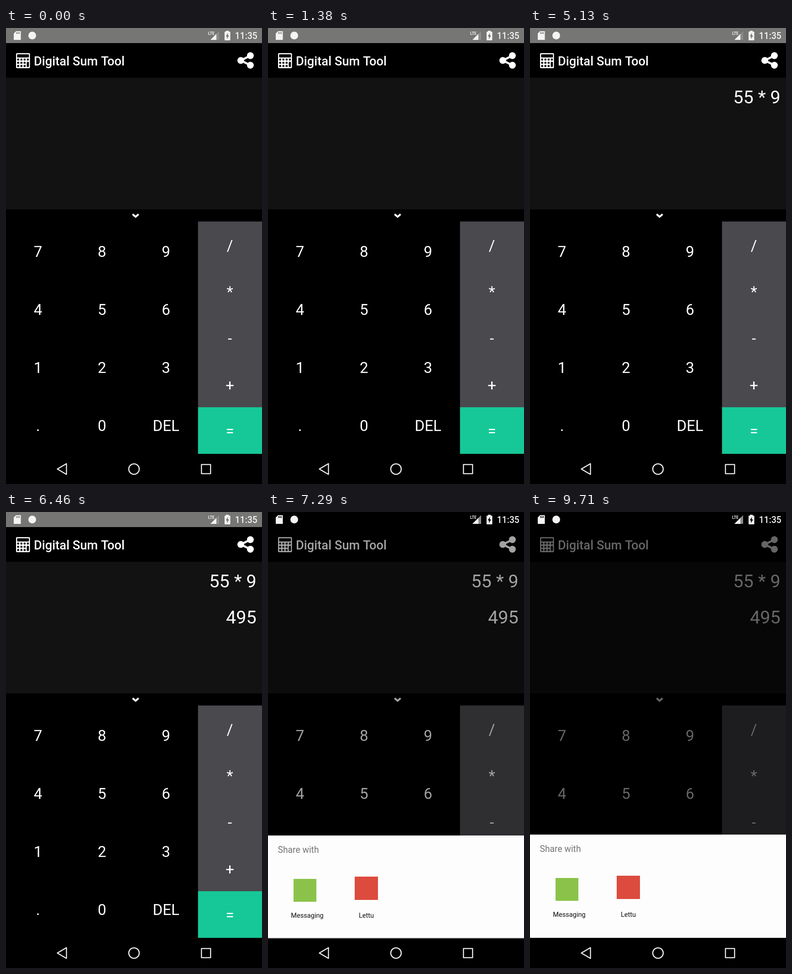
An HTML page with a canvas that plays this animation: 561 by 998 pixels, repeating every 9.75 s.

```html
<!DOCTYPE html>
<html lang="en">
<head>
<meta charset="utf-8">
<title>Calculator</title>
<style>
  html, body { margin: 0; width: 100%; height: 100%; overflow: hidden; background: #000; }
  canvas { display: block; }
</style>
</head>
<body>
<canvas id="stage" width="561" height="998"></canvas>
<script>
const W = 561, H = 998, LOOP = 9750;
const STATUS_H = 33, NAV_Y = 932.5, SHEET_Y = 706, SHEET_H = 226;
const SHARE_AT = 7170, RESULT_AT = 5840;
// Operand, operator and operand stay joined by spaces even while empty.
const INPUT = [[2040, '5  '], [3090, '55  '], [3710, '55 * '], [4750, '55 * 9']];
const KEYS = ['789', '456', '123'].map(row => [...row]).concat([['.', '0', 'DEL']]);
const OPERATORS = [...'/*-+='];

const screen = document.getElementById('stage').getContext('2d');
const sheet = Object.assign(document.createElement('canvas'), { width: W, height: SHEET_H });
let ctx = screen;

function rect(x, y, w, h, color) {
  ctx.fillStyle = color;
  ctx.fillRect(x, y, w, h);
}

function roundRect(x, y, w, h, r, color) {
  ctx.fillStyle = color;
  ctx.beginPath();
  ctx.roundRect(x, y, w, h, r);
  ctx.fill();
}

function disc(x, y, r, color) {
  ctx.fillStyle = color;
  ctx.beginPath();
  ctx.arc(x, y, r, 0, 7);
  ctx.fill();
}

function trace(points) {
  ctx.beginPath();
  points.forEach(([x, y]) => ctx.lineTo(x, y));
}

function polygon(points, color) {
  trace(points);
  ctx.fillStyle = color;
  ctx.fill();
}

function polyline(points, color, width) {
  trace(points);
  ctx.strokeStyle = color;
  ctx.lineWidth = width;
  ctx.stroke();
}

function text(str, x, y, size, color = '#fff', align = 'center', weight = 400) {
  ctx.font = `${weight} ${size}px Roboto, sans-serif`;
  ctx.textAlign = align;
  ctx.fillStyle = color;
  ctx.fillText(str, x, y);
}

function drawHeader() {
  roundRect(22, 55, 30.5, 33, 2.3, '#fff');
  roundRect(24.4, 57.4, 25.8, 7, 1.2, '#000');
  for (let row = 0; row < 3; row++) {
    for (let col = 0; col < 4; col++) disc(26.7 + col * 7.05, 69.1 + row * 7.05, 2.35, '#000');
  }
  rect(45.5, 76.2, 4.7, 7, '#000');
  text('Digital Sum Tool', 61, 81.5, 27.3, '#fff', 'left', 500);

  const nodes = [[535.5, 60.5], [514.5, 71], [535.5, 81.5]];
  polyline(nodes, '#fff', 4.7);
  nodes.forEach(([x, y]) => disc(x, y, 7.5, '#fff'));
}

function drawDisplay(t) {
  rect(0, 109, W, 288, '#121212');
  const typed = INPUT.filter(([at]) => t >= at).pop();
  if (typed) text(typed[1], 548.9, 164.9, 39.7, '#fff', 'right');
  if (t >= RESULT_AT) text('495', 548.9, 244.4, 39.7, '#fff', 'right');
}

function drawKeypad() {
  polyline([[277.5, 407.5], [284, 413.3], [290.5, 407.5]], '#fff', 4);
  KEYS.forEach((row, r) => row.forEach((key, c) =>
    text(key, 70.2 + c * 140.25, 500.6 + r * 127.2, 33.2)));
  rect(420.75, 423.5, 140.25, 406.5, '#4a494e');
  rect(420.75, 830, 140.25, 102, '#16c898');
  OPERATORS.forEach((op, i) => text(op, 490.7, 487.6 + i * 101.7, 33.2));
}

function paintSheet() {
  ctx = sheet.getContext('2d');
  rect(0, 0, W, SHEET_H, '#fdfdfd');
  text('Share with', 21.5, 38, 19.3, '#757575', 'left');
  rect(56, 95, 50, 50, '#8bc34a');
  rect(190, 90, 51, 51, '#dc4b3e');
  text('Messaging', 86, 180, 14.6, '#111');
  text('Lettu', 215.5, 180, 14.6, '#111');
  ctx = screen;
}

function showSheet(top, height, alpha, dy) {
  ctx.save();
  ctx.beginPath();
  ctx.rect(0, top, W, height);
  ctx.clip();
  ctx.globalAlpha = alpha;
  ctx.drawImage(sheet, 0, SHEET_Y + dy);
  ctx.restore();
}

function drawShare(elapsed) {
  const shown = Math.floor(elapsed / 40) * 40;
  const left = Math.exp(-(shown + 11) / 37);
  const alpha = Math.min(1, 1.03 * (1 - left));
  const dy = Math.round(80 * left);
  const dim = 0.6 * Math.min(1, shown / 200);
  rect(0, STATUS_H, W, NAV_Y - STATUS_H, `rgba(0,0,0,${dim})`);
  showSheet(0, NAV_Y, alpha, dy);
  showSheet(NAV_Y, H - NAV_Y, Math.min(alpha, 0.26), dy);
}

function drawStatus(color) {
  const ink = '#f4f4f4';
  rect(0, 0, W, STATUS_H, color);
  polygon([[22, 7], [32.5, 7], [32.5, 26], [17, 26], [17, 12]], ink);
  [22.5, 25.5, 28.5].forEach(x => rect(x, 9, 1.6, 4, color));
  disc(57.5, 16.5, 8.5, ink);

  polygon([[467, 7], [467, 26], [448, 26]], '#8c8c8c');
  polygon([[461, 13], [461, 26], [448, 26]], ink);
  text('LTE', 450, 15, 8.5, ink, 'center', 700);

  rect(482, 6, 6, 3, ink);
  roundRect(479, 8, 12.5, 19, 1, ink);
  polygon([[486.5, 10.5], [481.5, 18.5], [484.5, 18.5], [484, 24.5], [489, 16.3], [486, 16.3]], color);
  text('11:35', 550.8, 24, 19.3, ink, 'right', 500);
}

function drawNavIcons() {
  polyline([[123, 959], [112.5, 965.3], [132.5, 977], [132.5, 953.5], [112.5, 965.3]], '#eee', 2.3);
  ctx.beginPath();
  ctx.arc(280.5, 965.3, 11.5, 0, 7);
  ctx.stroke();
  ctx.strokeRect(428.3, 955.3, 20, 20);
}

function draw(t) {
  const sharing = t >= SHARE_AT;
  rect(0, 0, W, H, '#000');
  drawHeader();
  drawDisplay(t);
  drawKeypad();
  if (sharing) drawShare(t - SHARE_AT);
  drawStatus(sharing ? '#000' : '#767674');
  drawNavIcons();
}

paintSheet();
ctx.lineJoin = 'round';
const start = performance.now();
function tick() {
  draw((performance.now() - start) % LOOP);
  requestAnimationFrame(tick);
}
tick();
</script>
</body>
</html>
```
